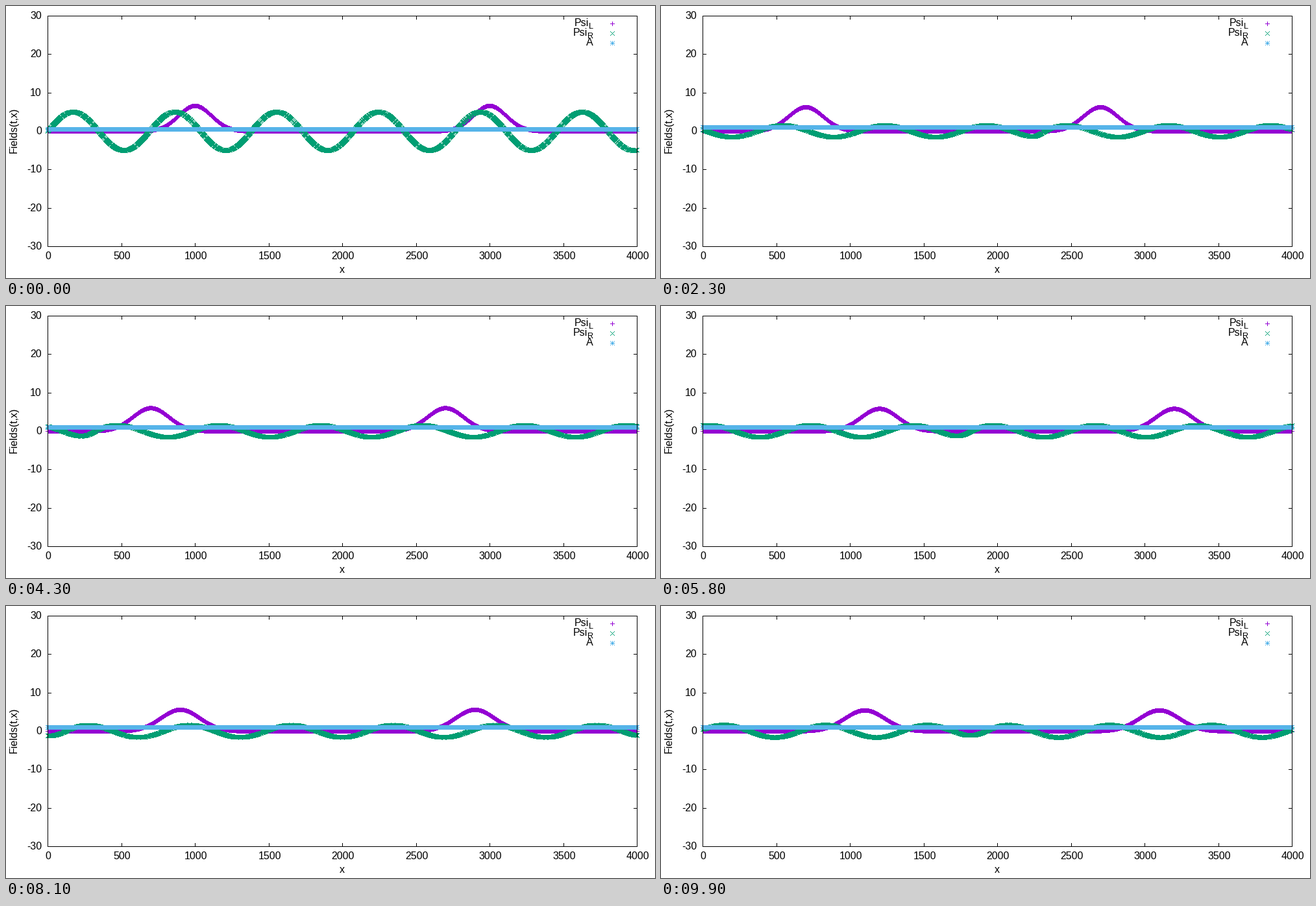
Recreate the animation shown at these times as a matplotlib script. Size 1000x420 px, loop 10000 ms.

```python
import numpy as np
import matplotlib.pyplot as plt
from matplotlib.animation import FuncAnimation

W, H, DPI = 1000, 420, 100
FRAMES, INTERVAL = 100, 100
LEFT, RIGHT, TOP, BOTTOM = 64, 972, 15, 371
PURPLE, GREEN, BLUE = (148, 0, 211), (0, 158, 115), (86, 180, 233)
FONT = "Liberation Sans"

X = np.arange(4001)
SPEED = 100           # cells travelled per frame
SIGMA = 112           # initial width of the pulses
SPREAD = 0.0048       # relative growth of the variance per frame
WAVE = 110            # inverse wave number of the sine

# Point symbols as pixel offsets
ARM = range(-3, 4)
PLUS = [(k, 0) for k in ARM] + [(0, k) for k in ARM]
CROSS = [(k, k) for k in ARM] + [(k, -k) for k in ARM]
STAR = PLUS + CROSS

SERIES = [(PURPLE, PLUS), (GREEN, CROSS), (BLUE, STAR)]


def col(x):
    return np.floor(LEFT + (RIGHT - LEFT) * np.asarray(x) / 4000 + 0.5).astype(int)


def row(y):
    up = np.floor((BOTTOM - TOP) * (np.asarray(y) + 30) / 60 + 0.5).astype(int)
    return BOTTOM - up


def stamp(img, cx, cy, symbol, color):
    for dx, dy in symbol:
        img[cy + dy, cx + dx] = color


def border(img):
    img[[TOP, BOTTOM], LEFT:RIGHT + 1] = 0
    img[TOP:BOTTOM + 1, [LEFT, RIGHT]] = 0


def backdrop():
    img = np.full((H, W, 3), 255, np.uint8)
    for c in col(np.arange(0, 4001, 500)):
        img[TOP:TOP + 6, c] = 0
        img[BOTTOM - 5:BOTTOM + 1, c] = 0
    for r in row(np.arange(-30, 31, 10)):
        img[r, LEFT:LEFT + 6] = 0
        img[r, RIGHT - 5:RIGHT + 1] = 0
    for i, (color, symbol) in enumerate(SERIES):
        stamp(img, 934, 27 + 15 * i, symbol, color)
    return img


def psi_left(n):
    """Two pulses drifting left while they diffuse."""
    growth = 1 + SPREAD * n
    d = (X + SPEED * n) % 2000 - 1000
    return 6.6 / np.sqrt(growth) * np.exp(-d**2 / (2 * SIGMA**2 * growth))


def psi_right(n):
    """A sine with a seam, drifting right; the seam is smoothed over time."""
    wave = np.sin(X / WAVE)
    if n == 0:
        return 5 * wave
    var = SIGMA**2 * SPREAD * n
    freq = np.fft.rfftfreq(X.size)
    damp = np.exp(-2 * np.pi**2 * freq**2 * var + var / (2 * WAVE**2))
    wave = np.fft.irfft(np.fft.rfft(wave) * damp, X.size)
    return (1.5 + 0.00125 * n) * np.roll(wave, SPEED * n)


def field_a(n):
    return np.full(X.size, 0.5 if n == 0 else 1.0)


BASE = backdrop()
COLS = col(X)


def render(n):
    img = BASE.copy()
    for (color, symbol), field in zip(SERIES, (psi_left, psi_right, field_a)):
        stamp(img, COLS, row(field(n)), symbol, color)
    border(img)
    return img


fig = plt.figure(figsize=(W / DPI, H / DPI), dpi=DPI, facecolor="white")
picture = fig.figimage(render(0), origin="upper")


def label(x, y, s, px=16, ha="left", va="baseline", **kw):
    fig.text(x / W, 1 - y / H, s, fontsize=px * 72 / DPI, family=FONT,
             ha=ha, va=va, color="black", **kw)


for v in range(-30, 31, 10):
    label(55, int(row(v)) + 5, str(v), ha="right")
for v in range(0, 4001, 500):
    label(int(col(v)) + 1, 391, str(v), ha="center")
label(518, 412, "x", ha="center")
label(12.5, 192, "Fields(t,x)", ha="center", va="center", rotation=90)

for y, sub, start in ((31, "L", 875.5), (46, "R", 873.5)):
    label(start, y, "Psi")
    label(start + 22.2, y + 4, sub, px=12.8)
label(905, 61, "A", ha="right")


def update(n):
    picture.set_data(render(n))
    return [picture]


anim = FuncAnimation(fig, update, frames=FRAMES, interval=INTERVAL,
                     repeat=True, repeat_delay=0, blit=False)
plt.show()
```
